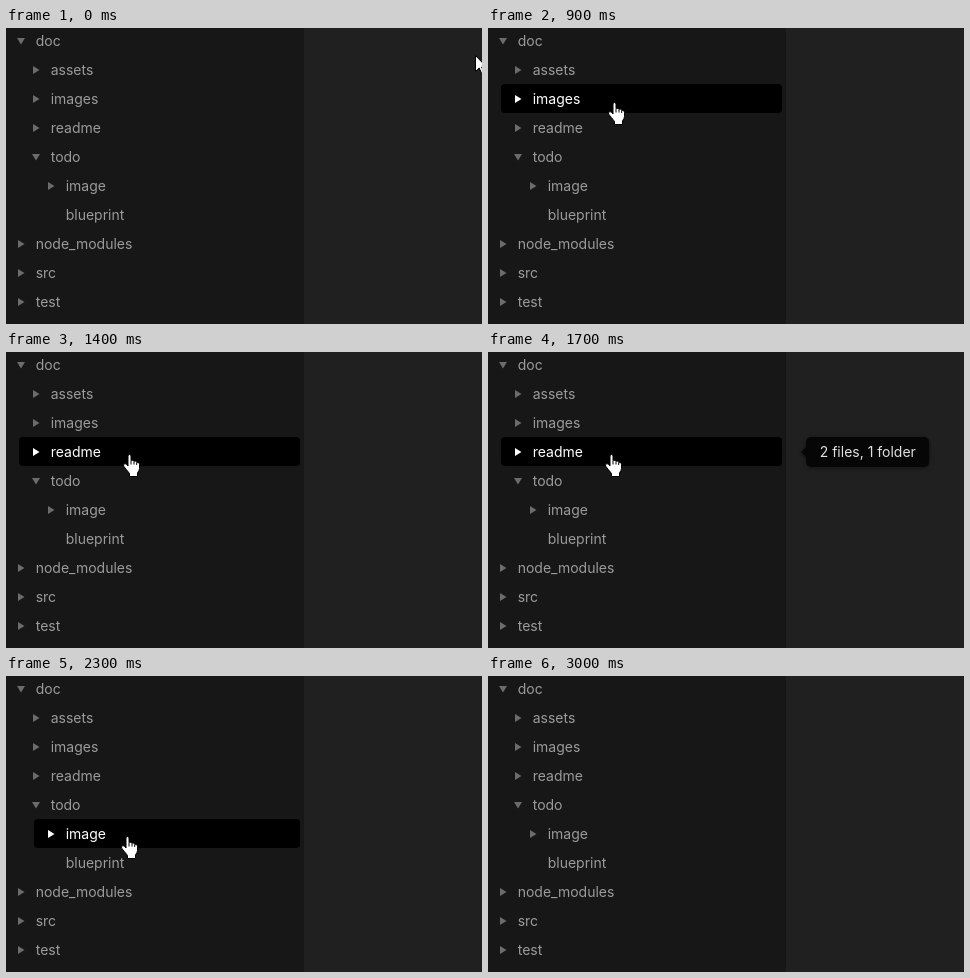
Animation, 476 px wide and 296 px high, one loop 3200 ms. Source, as an HTML page:

```html
<!DOCTYPE html>
<html lang="en">
<head>
<meta charset="utf-8">
<title>File tree tooltips</title>
<style>
  html, body { margin: 0; width: 100%; height: 100%; overflow: hidden; background: #202020; }
  svg { display: block; font: 14px Inter, sans-serif; }
  .row { fill: #9b9b9b; }
  .row rect { fill: none; }
  .row path { fill: #6c6c6c; }
  .row.hover, .row.hover path { fill: #fff; }
  .row.hover rect { fill: #000; }
  #tip { fill: #060606; }
  #tip text { fill: #e0e0e0; }
  #tip g { filter: drop-shadow(0 1px 2px #0006); }
  .cursor { fill: #fff; stroke: #000; }
</style>
</head>
<body>
<svg width="476" height="296" viewBox="0 0 476 296">
  <rect width="298" height="296" fill="#171717"/>
  <g id="tree"></g>
  <g id="tip">
    <g><rect id="bubble" x="318" y="-15" height="30" rx="5"/><path d="M313 0L319 -6V6Z"/></g>
    <text id="label" x="331.7" y="5"></text>
  </g>
  <path id="arrow" class="cursor" d="M.5 .5V16.5L4.2 13L6.7 18.6L9 17.6L6.6 12H11.5Z"/>
  <g id="hand" class="cursor">
    <path d="M5 2Q5 .5 6.5 .5T8 2V6.3Q10.4 5.8 11 7.2Q13 6.7 13.7 8.2Q16.5 7.8 16.5 10.5V14.5Q16.5 16 14.5 19V22.5H6.5V19.5Q3 15 .5 12Q.2 10 2 9.6Q3.5 9.8 5 12Z"/>
    <path d="M8 6.5V10.5M11 7.5V10.5M13.7 8.5V11" fill="none"/>
  </g>
</svg>
<script>
const LOOP = 3200, TICK = 100, ROW = 29, INDENT = 15, PANEL = 294;
const FADE_DELAY = 100, FADE = 150;
const $ = id => document.getElementById(id);

// name, depth, marker, tooltip
const rows = [
  ['doc', 0, 'open'],
  ['assets', 1, 'closed', '4 files, 1 folder'],
  ['images', 1, 'closed', '6 files, 2 folders'],
  ['readme', 1, 'closed', '2 files, 1 folder'],
  ['todo', 1, 'open', '1 file, 1 folder'],
  ['image', 2, 'closed', '24 files, 2 folders'],
  ['blueprint', 2, 'none'],
  ['node_modules', 0, 'closed'],
  ['src', 0, 'closed'],
  ['test', 0, 'closed']
];
const markers = {
  open: 'M11 -3H19L15 3.5Z',
  closed: 'M12 -4V4L18.5 0Z',
  none: ''
};

// Where the pointer rests; it moves evenly from one stop to the next.
const stops = [
  { arrive: 0, leave: 0, x: 470, y: 27 },
  { arrive: 300, leave: 800, x: 130, y: 50 },
  { arrive: 900, leave: 1300, x: 126, y: 75 },
  { arrive: 1400, leave: 1700, x: 123, y: 103 },
  { arrive: 1900, leave: 2100, x: 121, y: 135 },
  { arrive: 2300, leave: 2500, x: 121, y: 161 },
  { arrive: 2900, leave: 2900, x: 400, y: 32 },
  { arrive: 3000, leave: LOOP, x: 600, y: 27 }
];

function pointerAt(t) {
  const i = stops.findIndex(s => t <= s.leave);
  const to = stops[i], from = stops[i - 1];
  if (t >= to.arrive) return to;
  const k = (t - from.leave) / (to.arrive - from.leave);
  const mix = key => Math.round(from[key] + (to[key] - from[key]) * k);
  return { x: mix('x'), y: mix('y') };
}

function rowAt(t) {
  const { x, y } = pointerAt(t);
  return x < PANEL ? Math.floor((y + 2) / ROW) : -1;
}

function hoverAge(t) {
  let since = t;
  while (since > 0 && rowAt(since - TICK) === rowAt(t)) since -= TICK;
  return t - since;
}

$('tree').innerHTML = rows.map(([name, depth, marker], i) => {
  const dx = INDENT * depth;
  return `<g class="row" transform="translate(${dx} ${13 + ROW * i})">
    <rect x="-2" y="-15" width="${PANEL + 2 - dx}" height="${ROW}" rx="4"/>
    <path d="${markers[marker]}"/><text x="29.7" y="5">${name}</text></g>`;
}).join('');
const items = [...$('tree').children];
const place = (el, x, y) => el.setAttribute('transform', `translate(${x} ${y})`);
const show = (el, on) => el.setAttribute('visibility', on ? 'visible' : 'hidden');

function draw(now) {
  const t = Math.floor(now % LOOP / TICK) * TICK;
  const { x, y } = pointerAt(t), over = rowAt(t), hovering = over >= 0;
  items.forEach((el, i) => el.classList.toggle('hover', i === over));

  $('label').textContent = rows[over]?.[3] ?? '';
  $('bubble').setAttribute('width', $('label').getComputedTextLength() + 27);
  const opacity = (hoverAge(t) - FADE_DELAY) / FADE;
  $('tip').setAttribute('opacity', hovering ? Math.max(0, Math.min(1, opacity)) : 0);
  place($('tip'), 0, 13 + ROW * over);

  place($('hand'), x - 6, y - 1);
  place($('arrow'), x - 1, y);
  show($('hand'), hovering);
  show($('arrow'), !hovering);
  requestAnimationFrame(draw);
}
requestAnimationFrame(draw);
</script>
</body>
</html>
```
